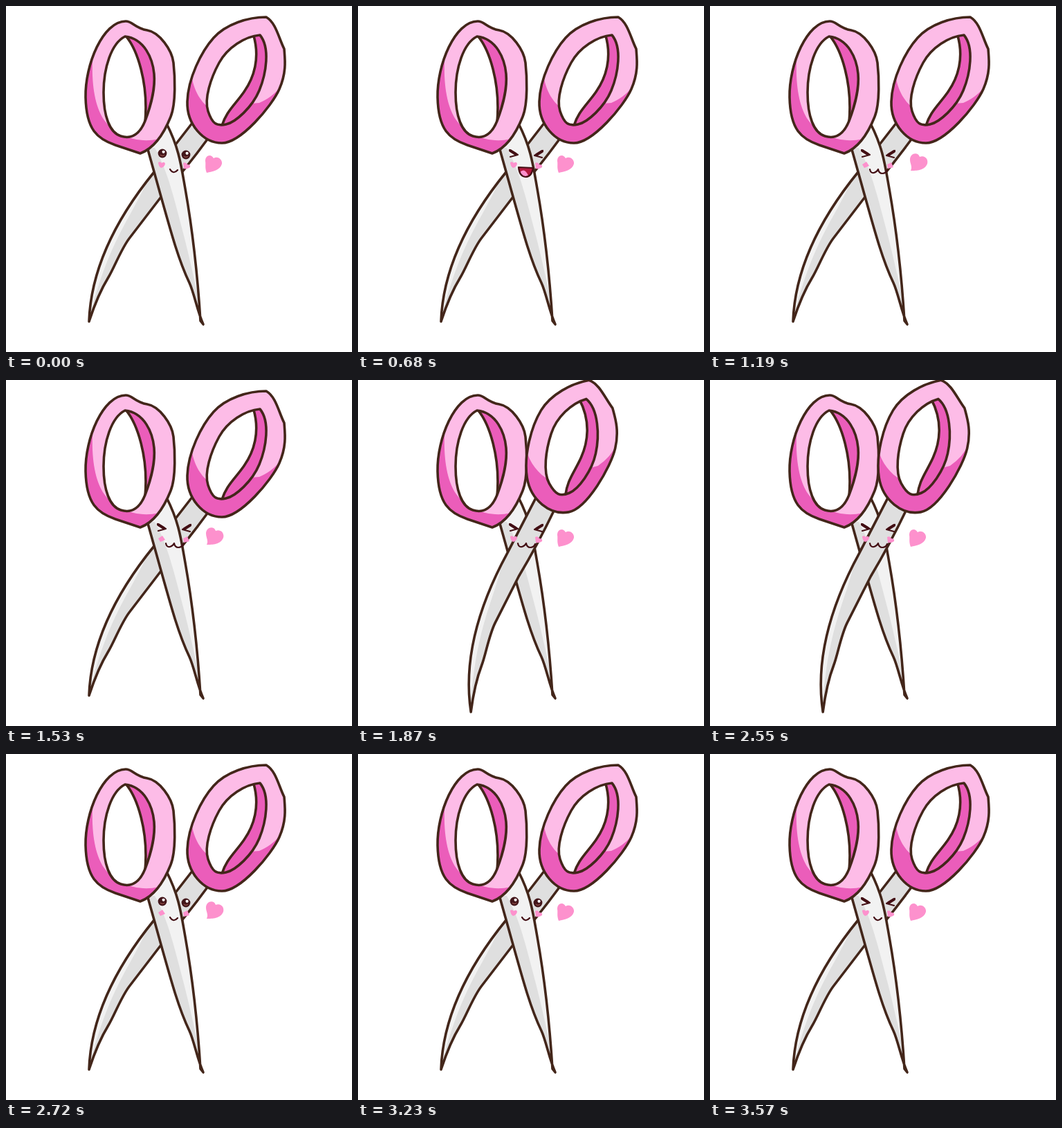
An HTML page for the animation above (3.74 s loop, 500 px wide and 500 px high).

```html
<!DOCTYPE html>
<html lang="en">
<head>
<meta charset="utf-8">
<title>Happy scissors</title>
<style>
  html, body { margin: 0; width: 100%; height: 100%; overflow: hidden; background: #fff; }

  /* one step = 170 ms, 22 steps per loop */
  svg {
    display: block; width: 100vw; height: 100vh;
    animation: 3740ms step-end infinite;
    animation-name: beat, pose, eyes, mouth;
  }

  .line { fill: none; stroke: #43261a; stroke-width: 3.6; stroke-linecap: round; stroke-linejoin: round; }
  .thin { stroke: #430f14; stroke-width: 2.2; }
  .lid { stroke-width: 4; }
  .light { fill: #fdbce7; }
  .deep { fill: #eb5dba; }
  .steel { fill: #f2f2f2; }
  .shade { fill: #dfdfdf; }
  .blush { fill: #fd91cd; }
  .dark { fill: #43161a; }
  .white { fill: #fff; }

  .beatA { visibility: var(--beatA); }
  .beatB { visibility: var(--beatB); }
  .apart { visibility: var(--apart); }
  .together { visibility: var(--together); }
  .awake { visibility: var(--awake); }
  .squint { visibility: var(--squint); }
  .smile { visibility: var(--smile); }
  .laugh { visibility: var(--laugh); }
  .purr { visibility: var(--purr); }

  @keyframes beat {
    0%, 13.636%, 27.272%, 36.363%, 50%, 68.181%, 77.272%, 86.363%, 95.454%, 100% { --beatA: visible; --beatB: hidden; }
    4.545%, 22.727%, 31.818%, 40.909%, 59.09%, 72.727%, 81.818%, 90.909% { --beatA: hidden; --beatB: visible; }
  }
  @keyframes pose {
    0%, 54.545%, 72.727%, 100% { --apart: visible; --together: hidden; }
    45.454%, 63.636% { --apart: hidden; --together: visible; }
  }
  @keyframes eyes {
    0%, 72.727%, 100% { --awake: visible; --squint: hidden; }
    9.09%, 90.909% { --awake: hidden; --squint: visible; }
  }
  @keyframes mouth {
    0%, 72.727%, 100% { --smile: visible; --laugh: hidden; --purr: hidden; }
    18.181% { --smile: hidden; --laugh: visible; --purr: hidden; }
    31.818% { --smile: hidden; --laugh: hidden; --purr: visible; }
  }
</style>
</head>
<body>
<svg viewBox="0 0 500 500">
  <defs>
    <path id="ringL" d="M173 22C140 22 114 85 115 132S132 192 158 201L194 213C216 205 230 180 238 160S244 100 242 82 222 38 204 35 183 22 173 22Z"/>
    <path id="holeL" d="M172 44C152 54 141 90 141 125S150 183 166 188 194 184 201 166 216 120 214 98 200 47 172 44Z"/>
    <path id="wedgeL" d="M172 42C190 62 206 112 201 168L220 175V35Z"/>
    <path id="bladeL" d="M200 190L232 170C250 205 253 230 259 264S275 360 281 455L285 460C276 440 272 415 265 400C246 360 236 317 204 204Z"/>

    <path id="ringR" d="M376 16C350 16 318 26 300 46S263 105 262 138 285 198 312 198 384 145 395 120 403 76 402 62C394 46 390 24 376 16Z"/>
    <path id="holeR" d="M367 42C345 44 320 60 308 82S286 134 292 152 304 174 318 171 356 146 366 122 382 60 367 42Z"/>
    <path id="wedgeR" d="M357 40C368 75 358 104 344 124S318 152 311 176L385 175V35Z"/>
    <path id="bladeR" d="M270 168L214 240C170 294 123 368 120 456C130 425 140 405 148 392S166 352 178 336L224 276C240 258 260 235 293 190Z"/>

    <clipPath id="inRingL"><use href="#ringL"/></clipPath>
    <clipPath id="inHoleL"><use href="#holeL"/></clipPath>
    <clipPath id="inBladeL"><use href="#bladeL"/></clipPath>
    <clipPath id="inRingR"><use href="#ringR"/></clipPath>
    <clipPath id="inHoleR"><use href="#holeR"/></clipPath>
    <clipPath id="inBladeR"><use href="#bladeR"/></clipPath>

    <g id="rightHalf">
      <use href="#bladeR" class="steel"/>
      <path class="shade" clip-path="url(#inBladeR)" d="M240 160L205 250C185 300 150 335 122 445H180L300 190Z"/>
      <use href="#bladeR" class="line"/>
      <use href="#ringR" class="light"/>
      <path class="deep" clip-path="url(#inRingR)" d="M267 88C268 115 278 135 292 146L366 140Q390 130 404 106V210H250Z"/>
      <use href="#holeR" class="white"/>
      <g clip-path="url(#inHoleR)">
        <use href="#wedgeR" class="deep"/>
        <use href="#wedgeR" class="line"/>
      </g>
      <use href="#holeR" class="line"/>
      <use href="#ringR" class="line"/>
    </g>

    <g id="leftHalf">
      <use href="#bladeL" class="steel"/>
      <path class="shade" clip-path="url(#inBladeL)" d="M215 205C226 225 234 245 246 290S270 380 283 450H200V205Z"/>
      <use href="#bladeL" class="line"/>
      <use href="#ringL" class="light"/>
      <path class="deep" clip-path="url(#inRingL)" d="M126 60C122 110 128 145 142 165S190 200 220 192V215H100V60Z"/>
      <use href="#holeL" class="white"/>
      <g clip-path="url(#inHoleL)">
        <use href="#wedgeL" class="deep"/>
        <use href="#wedgeL" class="line"/>
      </g>
      <use href="#holeL" class="line"/>
      <use href="#ringL" class="line"/>
    </g>

    <g id="eye">
      <circle class="dark" r="6.4"/>
      <circle class="white" cx="1.6" cy="-2.2" r="2.1"/>
      <path d="M-3 2Q0 5 3 2" fill="none" stroke="#8b4a45" stroke-width="1.4"/>
    </g>
    <g id="closedEye" class="line thin">
      <path class="lid" d="M-5 -4L3 1"/>
      <path d="M-6 -5L6 2L-5 5"/>
    </g>
  </defs>

  <use href="#rightHalf" class="apart"/>
  <use href="#leftHalf"/>
  <use href="#rightHalf" class="together" transform="translate(.5 4) rotate(-10.6 248 236)"/>

  <g class="awake">
    <use href="#eye" x="226" y="213"/>
    <use href="#eye" x="260" y="215"/>
  </g>
  <g class="squint">
    <use href="#closedEye" x="225" y="213"/>
    <use href="#closedEye" transform="translate(261 214) scale(-1 1)"/>
  </g>

  <g class="beatA blush">
    <path d="M290 241C287 234 289 229 288 224C288 216 296 213 300 220C306 216 313 222 312 228C310 237 299 239 290 241Z"/>
    <path d="M220 226Q223 224 225 227Q229 224 230 228Q229 233 224 234Q220 231 220 226Z"/>
    <path d="M256 227Q260 225 262 229Q267 229 266 233Q262 236 257 235Z"/>
  </g>
  <g class="beatB blush">
    <path d="M290 238C293 232 289 228 289 222C289 213 300 210 303 218C310 215 316 221 314 228C310 238 298 238 290 238Z"/>
    <path d="M220 229L226 225L230 231L223 234Z"/>
    <path d="M256 229L262 226L265 233L257 235Z"/>
  </g>

  <path class="line thin smile" d="M237 236Q242 244 248 237"/>
  <g class="laugh">
    <path id="grin" d="M232 233L253 234Q251 247 242 247Q233 246 232 233Z" fill="#b3193f"/>
    <path class="blush" d="M234 240Q241 233 246 245Q238 249 234 240Z"/>
    <path class="line thin" d="M232 233L253 234Q251 247 242 247Q233 246 232 233Z"/>
  </g>
  <path class="line thin purr" d="M231 236Q232 242 237 241Q241 240 243 236Q244 242 249 242Q254 242 256 237"/>
</svg>
</body>
</html>
```
